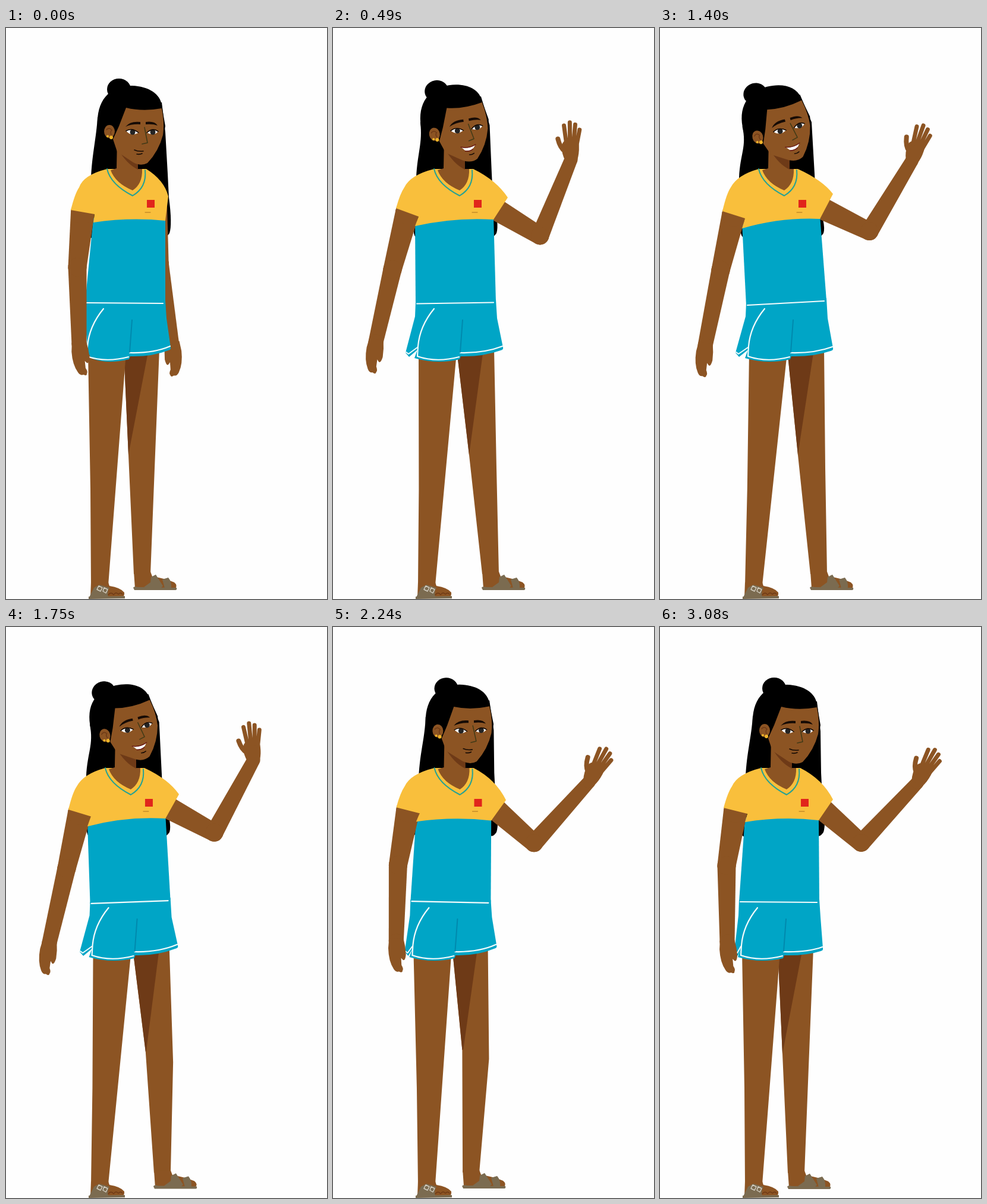
An HTML page with a canvas for the animation above (3150 ms loop, 540 px wide and 960 px high).

```html
<!DOCTYPE html>
<html lang="en">
<head>
<meta charset="utf-8">
<title>Waving woman</title>
<style>
html, body { margin: 0; width: 100%; height: 100%; overflow: hidden; background: #fefefe; }
canvas { display: block; }
</style>
</head>
<body>
<canvas id="stage" width="540" height="960"></canvas>
<script>
const ctx = document.getElementById('stage').getContext('2d');
const LOOP = 3150, STEP = 70, RAD = Math.PI / 180;
const SKIN = '#8c5423', SHADE = '#6e3a17', BLUE = '#00a5c6', YELLOW = '#f9bf3c',
  TAUPE = '#7b6b50', INK = '#160b05', WHITE = '#f4fbfc';

// Poses: rest, raised, lean back, step forward, relaxed wave
const TIMES = [0, 490, 770, 1680, 1960, 2380];
const ORDER = [0, 1, 2, 2, 3, 4];

// hip x, waist tilt, neck x, sleeve outer, sleeve inner, yoke left, yoke right, right sleeve tip
const TORSO = [
  [0, 0, 0, 109, 306, 149, 313, 147, 327, 268, 324, 273, 283],
  [6, -1.5, 0, 106, 303, 144, 317, 138, 333, 270, 322, 294, 285],
  [12, -4, -4, 105, 308, 143, 320, 138, 337, 269, 321, 291, 279],
  [-10, 3, 2, 105, 301, 142, 311, 131, 325, 264, 327, 291, 294],
  [0, 0, 0, 107, 304, 147, 314, 143, 328, 267, 325, 291, 290]
];
// flap x, hem corner, hip inner/outer/shade x, knee inner, knee outer, foot shift, shade tip x
const LEGS = [
  [138, 277, 537, 198, 258, 240, 206, 718, 250, 740, 0, 0, 206],
  [116, 280, 537, 208, 271, 253, 229, 718, 275, 740, 36, 0, 229],
  [115, 279, 538, 214, 276, 259, 232, 718, 278, 740, 38, 0, 232],
  [118, 289, 524, 208, 268, 252, 250, 692, 298, 687, 12, -4, 257],
  [125, 274, 540, 198, 258, 240, 206, 718, 250, 740, 0, 0, 206]
];
// left elbow, left wrist y, right shoulder x, upper arm, forearm, hand bend, wave size
const ARMS = [
  [120, 402, 532, 252, 86, -81, 0, 0],
  [100, 406, 528, 266, 31, 66, 13, 13],
  [102, 407, 534, 266, 26, 59, 13, 25],
  [102, 398, 523, 266, 42, 51, 13, 33],
  [112, 401, 530, 266, 41, 47, 15, 33]
];
// rotation, shift, hair left, hair right, smile
const HEAD = [
  [0, 0, 0, 143, 272, 0],
  [-10, 6, -1.6, 140, 267, 1],
  [-16, 4.6, -1.4, 133, 260, 1],
  [-6, 9.4, -.7, 145, 272, 0],
  [0, 2, 0, 144, 271, 0]
];
const WRIST_TIMES = [0, 330, 490, 770, 1400, 1680, 1960, 2380];
const WRIST_X = [123, 62, 72, 78, 76, 70, 87, 113];

function fill(color, d) {
  ctx.fillStyle = color;
  ctx.fill(new Path2D(d));
}
function line(color, width, d) {
  ctx.strokeStyle = color;
  ctx.lineWidth = width;
  ctx.stroke(new Path2D(d));
}
function oval(color, x, y, rx, ry = rx) {
  ctx.fillStyle = color;
  ctx.beginPath();
  ctx.ellipse(x, y, rx, ry, 0, 0, 7);
  ctx.fill();
}
function at(x, y, angle, draw) {
  ctx.save();
  ctx.translate(x, y);
  ctx.rotate(angle);
  draw();
  ctx.restore();
}
// Tapered segment with round ends
function limb(x1, y1, r1, x2, y2, r2) {
  const a = Math.atan2(y2 - y1, x2 - x1), nx = -Math.sin(a), ny = Math.cos(a);
  fill(SKIN, `M${x1 + nx * r1} ${y1 + ny * r1}L${x2 + nx * r2} ${y2 + ny * r2}
    L${x2 - nx * r2} ${y2 - ny * r2}L${x1 - nx * r1} ${y1 - ny * r1}Z`);
  oval(SKIN, x1, y1, r1);
  oval(SKIN, x2, y2, r2);
}
function segment(times, t) {
  let i = 0;
  while (i < times.length - 2 && t >= times[i + 1]) i++;
  const p = Math.min(1, (t - times[i]) / (times[i + 1] - times[i]));
  return [i, p * p * (3 - 2 * p)];
}
const lerp = (a, b, p) => a + (b - a) * p;

function restHand() {
  fill(SKIN, `M-12 -5L-13 12Q-12 34 -3 47Q1 53 6 51Q12 54 12 49Q14 46 10 40L9 28
    L12 31Q16 34 17 22Q16 8 12 -5Z`);
}
function openHand() {
  fill(SKIN, 'M-10 2Q-16 -10 -15 -24Q-12 -34 0 -34Q14 -34 14 -22Q14 -8 10 2Z');
  line(SKIN, 7, 'M-7 -27L-10 -57M-1 -28L0 -62M5 -27L9 -58M10 -23L16 -49');
  line(SKIN, 8, 'M-10 -14Q-18 -20 -21 -35');
}

function rightArm([, , , sx, upper, fore, bend, wave], beat, droop) {
  const u = upper * RAD, f = (fore + wave / 6 * beat) * RAD;
  const ex = sx + 96 * Math.cos(u), ey = 300 + 96 * Math.sin(u);
  const wx = ex + 139 * Math.cos(f), wy = ey - 139 * Math.sin(f);
  limb(sx, 300, 19, ex, ey, 15);
  limb(ex, ey, 15, wx, wy, 11);
  const hand = f + (bend + wave * beat - droop) * RAD;
  if (fore > -30) at(wx, wy, Math.PI / 2 - hand, openHand);
  else at(wx, wy, -Math.PI / 2 - hand, () => { ctx.scale(-1, 1); restHand(); });
}
function leftArm([ex, ey, wy], wx, sx, sy) {
  limb(sx, sy, 20, ex, ey, 15.5);
  limb(ex, ey, 15.5, wx, wy, 12.5);
  at(wx, wy, Math.atan2(ex - wx, wy - ey), restHand);
}

function legs([, , , hipIn, hipOut, shadeX, kix, kiy, kox, koy, fx, fy, tipX], dx) {
  fill(SKIN, `M${hipIn} 540L${hipOut} 540L${kox} ${koy}L${243 + fx} ${918 + fy}
    L${215 + fx} ${918 + fy}L${kix} ${kiy}Z`);
  fill(SHADE, `M${hipIn} 540L${shadeX} 540L${tipX} ${kiy - 1}L${kix} ${kiy}Z`);
  fill(SKIN, `M${138 + dx} 545L${202 + dx} 545L172 937L143 937L${142 + dx * .4} 775Z`);

  at(fx, fy, 0, () => {
    fill(SKIN, 'M215 914L243 914L246 922Q266 925 283 932Q289 937 285 942L217 942Z');
    fill(TAUPE, `M214 941Q215 938 222 940L287 941Q288 945 285 945L216 945Z
      M232 940L243 932L244 923L252 919L264 938L260 942Z
      M263 927L273 924Q279 931 278 942L267 942Z`);
  });
  fill(SKIN, 'M143 932L172 932L174 938Q193 941 199 949Q200 956 194 957L142 957Z');
  fill(TAUPE, `M139 956L200 955L200 959L139 960Z
    M142 953L148 941L157 936L174 941Q170 947 172 957L140 957Z`);
  line(SHADE, 1.3, 'M172 953Q177 947 181 953Q185 947 189 952Q193 948 196 952');
  line('#d5cfc2', 1.4, 'M156 938L162 941L159 947L153 944ZM165 941L171 944L168 950L163 947Z');
}

function shorts([flap, cx, cy], dx, tilt) {
  at(dx, 0, 0, () => {
    const l = 459 - tilt, r = 458 + tilt;
    fill(BLUE, `M133 ${l}L268 ${r}L270 488L${cx} ${cy}Q${cx + 1} ${cy + 4} ${cx - 4} ${cy + 5}
      Q245 553 209 552L207 557Q170 566 ${Math.max(131, flap + 5)} 555L136 541
      L${flap + 6} 553L${flap} 546L132 485Z`);
    line(WHITE, 2.2, `M164 472Q140 501 137 535L136 552Q168 563 206 553
      M208 546Q248 547 ${cx - 1} ${cy - 2}`);
    if (flap < 135) line(WHITE, 2, `M${flap + 1} 545L${flap + 5} 548L136 537`);
    line('#0089ad', 2, 'M212 491L208 545');
  });
}

function shirtBody([dx, tilt, , , , , , blx, bly, brx, bry]) {
  fill(BLUE, `M${blx} ${bly - 8}L${brx} ${bry - 6}L${268 + dx} ${462 + tilt}L${133 + dx} ${462 - tilt}Z`);
  line(WHITE, 2.2, `M${135 + dx} ${462 - tilt}L${264 + dx} ${463 + tilt}`);
}
function yoke([, , n, sox, soy, six, siy, blx, bly, brx, bry, rtx, rty]) {
  fill(YELLOW, `M${170 + n} 237Q130 247 ${sox + 14} 268Q${sox + 7} 278 ${sox} ${soy}L${six} ${siy}
    L${blx} ${bly}Q${(blx + brx) / 2} 318 ${brx} ${bry}L${rtx} ${rty}
    Q${lerp(262, rtx, .4)} 256 ${236 + n} 237Z`);
  at(n, 0, 0, () => {
    ctx.fillStyle = '#e1251b';
    ctx.fillRect(237, 289, 13, 13);
    line('#a9701f', 1, 'M234 310L243 310');
  });
}
function neck(n) {
  at(n, 0, 0, () => {
    fill(SKIN, 'M187 185L222 210L222 237L229 237Q230 262 213 273Q184 261 176 239L186 236Z');
    fill(SHADE, 'M188 203L222 218L222 238Q203 229 188 203Z');
    line('#25a294', 2, 'M170 237Q176 263 213 282Q237 268 234 239');
  });
}

function headSpace([rot, ox, oy], draw) {
  at(205 + ox, 230 + oy, rot * RAD, () => {
    ctx.translate(-205, -230);
    draw();
  });
}
function hair(head) {
  const [rot, ox, oy, left, right] = head, c = Math.cos(rot * RAD), s = Math.sin(rot * RAD);
  const turn = (x, y) =>
    `${205 + ox + (x - 205) * c - (y - 230) * s} ${230 + oy + (x - 205) * s + (y - 230) * c}`;
  fill('#000', `M${turn(154, 150)}C${turn(152, 185)} ${left + 2} 210 ${left} 252L136 345
    Q138 356 150 352L262 345Q266 358 275 345Q280 330 ${right + 2} 285L${right} 245
    L${turn(268, 175)}L${turn(262, 125)}Z`);
  headSpace(head, () => {
    oval('#000', 190, 103, 20, 18);
    fill('#000', 'M154 165C152 124 172 97 212 97C240 98 260 111 262 130L268 165L262 195L186 212Z');
  });
}
function face(head) {
  headSpace(head, () => {
    fill(SKIN, `M202 134Q230 141 262 135Q267 160 264 180Q257 207 238 227Q227 233 214 226
      L187 208L180 187L190 165Z`);
    oval(SKIN, 174, 174, 9, 11);
    line(SHADE, 1.5, 'M169 171Q174 166 178 172Q175 174 177 179');
    oval('#f0b429', 177, 184, 3);
    oval('#f0b429', 171, 182, 2);

    fill('#fff', 'M202 173Q211 167 223 176Q211 183 202 173ZM237 176Q247 167 256 174Q249 182 237 176Z');
    oval('#242424', 213, 175, 4.5);
    oval('#242424', 247, 175, 4.5);
    line(INK, 1.6, 'M202 173Q212 167 223 176M237 176Q247 167 256 174');
    fill(INK, `M201 166Q209 156 226 158L226 162Q212 161 201 166Z
      M235 158Q250 156 255 164Q247 161 235 162Z`);
    line(SHADE.replace('6e', '40'), 1.5, 'M233 167L238 193L229 195');
    if (head[5] > .5) {
      fill('#fff', 'M215 204Q226 208 238 204Q232 214 220 210Z');
      line('#6b1d18', 1.5, 'M214 203Q226 208 239 203M220 211Q227 213 233 210');
      line(INK, 1.5, 'M226 218Q230 219 234 217');
    } else {
      line(INK, 1.6, 'M216 205Q222 208 231 207M220 212Q225 213 229 211');
    }
  });
}

function render(t) {
  const [i, p] = segment(TIMES, t);
  const pose = table => table[ORDER[i]].map((v, k) => lerp(v, table[ORDER[i + 1]][k], p));
  const torso = pose(TORSO), leg = pose(LEGS), arms = pose(ARMS), head = pose(HEAD);
  const [w, q] = segment(WRIST_TIMES, t);
  const wristX = lerp(WRIST_X[w], WRIST_X[w + 1], q);
  const beat = Math.cos((t - 35) / 420 * 2 * Math.PI);
  const droop = i ? 0 : 55 * Math.sin(Math.PI * p);
  const [dx, tilt, n, sox, soy, six, siy] = torso;

  ctx.fillStyle = '#fefefe';
  ctx.fillRect(0, 0, 540, 960);
  ctx.lineCap = ctx.lineJoin = 'round';
  hair(head);
  rightArm(arms, beat, droop);
  legs(leg, dx);
  shorts(leg, dx, tilt);
  shirtBody(torso);
  leftArm(arms, wristX, (sox + six) / 2, (soy + siy) / 2);
  yoke(torso);
  neck(n);
  face(head);
}

function tick(now) {
  const t = now % LOOP;
  render(t - t % STEP);
  requestAnimationFrame(tick);
}
tick(performance.now());
</script>
</body>
</html>
```
